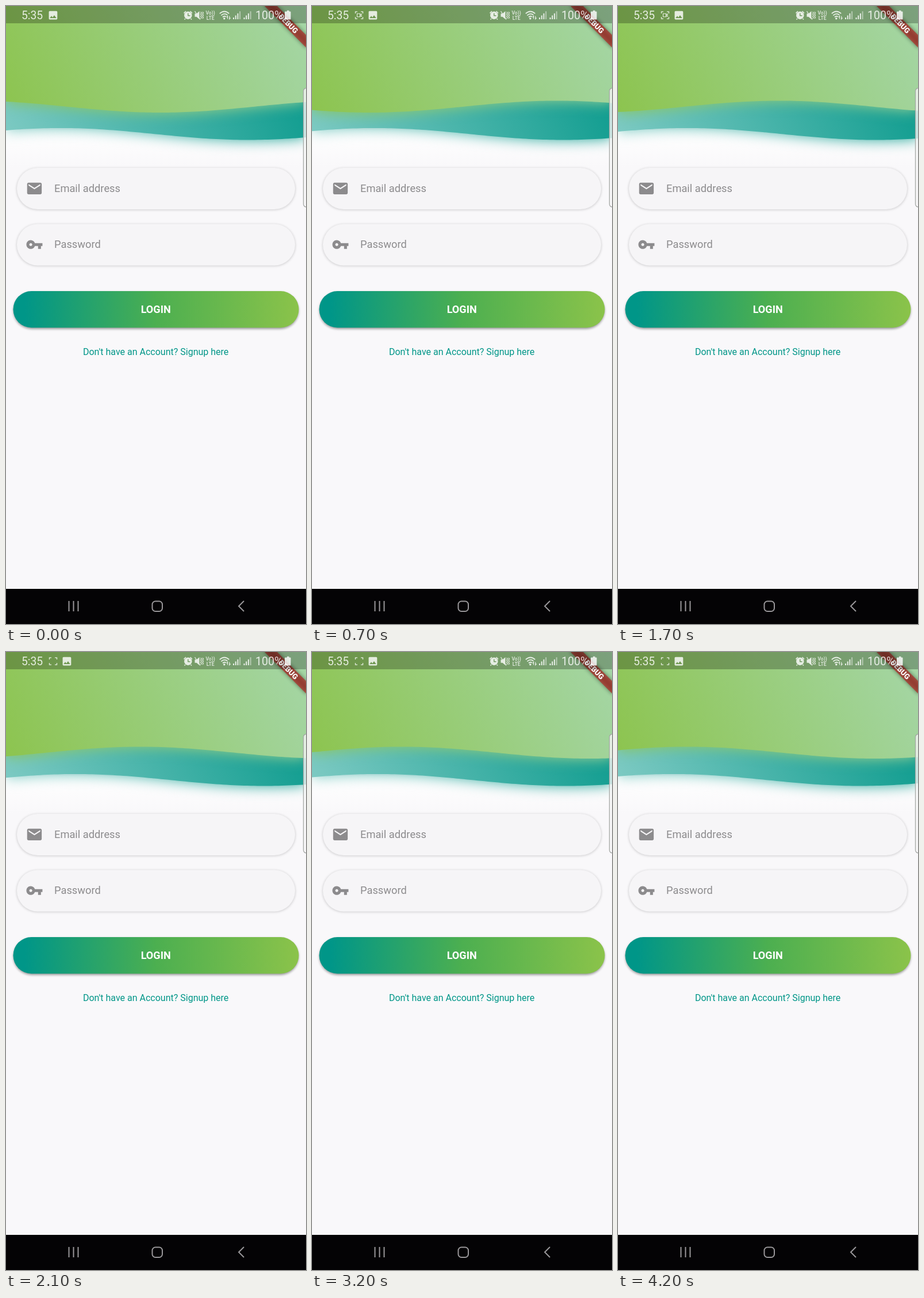
Animation, 522 px wide and 1073 px high, one loop 4300 ms. Source, as an HTML page:

```html
<!DOCTYPE html>
<html lang="en">
<head>
<meta charset="utf-8">
<title>Login</title>
<style>
  html, body { margin: 0; width: 100%; height: 100%; overflow: hidden; background: #f9f8fa; }
  svg { display: block; width: 522px; height: 1073px; font-family: Roboto, sans-serif; }
</style>
</head>
<body>
<svg viewBox="0 0 522 1073" xmlns="http://www.w3.org/2000/svg">
  <defs>
    <linearGradient id="lime" gradientUnits="userSpaceOnUse" x1="0" y1="255" x2="522" y2="0">
      <stop offset="0" stop-color="#8bc34a"/><stop offset="1" stop-color="#a5d6a7"/>
    </linearGradient>
    <linearGradient id="teal" gradientUnits="userSpaceOnUse" x1="0" y1="255" x2="522" y2="0">
      <stop offset="0" stop-color="#80cbc4"/><stop offset="1" stop-color="#009688"/>
    </linearGradient>
    <linearGradient id="action">
      <stop offset="0.04" stop-color="#009688"/><stop offset="0.5" stop-color="#4caf50"/><stop offset="1" stop-color="#8bc34a"/>
    </linearGradient>
    <linearGradient id="page" x2="0" y2="1">
      <stop offset="0" stop-color="#fff"/><stop offset="1" stop-color="#f9f8fa"/>
    </linearGradient>
    <filter id="glow" filterUnits="userSpaceOnUse" x="-50" y="-50" width="622" height="360" color-interpolation-filters="sRGB">
      <feGaussianBlur stdDeviation="12"/>
    </filter>
    <filter id="soft" x="-10%" y="-30%" width="120%" height="160%"><feGaussianBlur stdDeviation="2.2"/></filter>
    <filter id="dim" x="-30%" y="-60%" width="160%" height="220%"><feGaussianBlur stdDeviation="3.5"/></filter>
  </defs>

  <rect width="522" height="1073" fill="#f9f8fa"/>
  <rect y="215" width="522" height="65" fill="url(#page)"/>

  <g fill="url(#teal)"><path class="low" filter="url(#glow)"/><path class="low"/></g>
  <g fill="url(#lime)"><path class="high" filter="url(#glow)"/><path class="high"/></g>

  <g id="fields">
    <g fill="#000" filter="url(#soft)" opacity=".17">
      <rect x="18.5" y="281.5" width="485" height="72.5" rx="36"/>
      <rect x="18.5" y="379" width="485" height="72.5" rx="36"/>
    </g>
    <g fill="#f6f5f7">
      <rect x="19" y="281" width="484" height="72" rx="36"/>
      <rect x="19" y="378.5" width="484" height="72" rx="36"/>
    </g>
    <g fill="#8c8b8d">
      <path transform="translate(34.2 301.7) scale(1.27)" d="M20 4H4c-1.1 0-1.99.9-1.99 2L2 18c0 1.1.9 2 2 2h16c1.1 0 2-.9 2-2V6c0-1.1-.9-2-2-2zm0 4l-8 5-8-5V6l8 5 8-5v2z"/>
      <path transform="translate(34.2 399) scale(1.27)" d="M12.65 10C11.83 7.67 9.61 6 7 6c-3.31 0-6 2.69-6 6s2.69 6 6 6c2.61 0 4.83-1.67 5.65-4H17v4h4v-4h2v-4H12.65zM7 14c-1.1 0-2-.9-2-2s.9-2 2-2 2 .9 2 2-.9 2-2 2z"/>
      <text x="84" y="322.5" font-size="18.3">Email address</text>
      <text x="84" y="420" font-size="18.3">Password</text>
    </g>
  </g>

  <rect x="13" y="497.5" width="496" height="63" rx="31.5" filter="url(#soft)" opacity=".42"/>
  <rect x="12.5" y="495" width="497" height="63.5" rx="31.75" fill="url(#action)"/>
  <g text-anchor="middle">
    <text x="260.7" y="532.5" font-size="18.1" font-weight="700" fill="#fff">LOGIN</text>
    <text x="260.6" y="605.5" font-size="16" fill="#009688">Don't have an Account? Signup here</text>
  </g>

  <g transform="translate(522 0) rotate(45)">
    <rect x="-52" y="35.5" width="104" height="15.5" filter="url(#dim)" opacity=".45"/>
    <rect x="-52" y="35.5" width="104" height="15.5" fill="#b71c1c" fill-opacity=".63"/>
    <text y="47.8" font-size="12.9" font-weight="900" fill="#fff" text-anchor="middle">DEBUG</text>
  </g>

  <rect width="522" height="30" fill-opacity=".25"/>
  <g fill="#fff" stroke="#fff" stroke-width="0" opacity=".82">
    <text x="27" y="23" font-size="19.3">5:35</text>
    <path id="photo" d="M21 19V5c0-1.1-.9-2-2-2H5c-1.1 0-2 .9-2 2v14c0 1.1.9 2 2 2h14c1.1 0 2-.9 2-2zM8.5 13.5l2.5 3.01L14.5 12l4.5 6H5l3.5-4.5z"/>
    <path id="corners" d="M75.5 13V9.800H79M85 9.800H88.500V13M88.500 19V22.200H85M79 22.200H75.500V19" fill="none" stroke-width="1.3"/>
    <path id="camera" d="M78.500 13.300H83.500V18.700H78.500ZM83.500 15.500L86 13.800V18.200L83.500 16.500" fill="none" stroke-width="1.1"/>

    <path d="M309.500 12.500L313 9M324 12.500L320.500 9M312 22L310.500 23.500M321.500 22L323 23.500" stroke-width="1.7"/>
    <path fill-rule="evenodd" d="M316.800 9.500a6.700 6.700 0 1 0 .01 0zM316 12.500h1.500v3.400h3v1.500h-4.500z"/>

    <path d="M328.500 13.300H331.500L336.500 9V23L331.500 18.700H328.500Z"/>
    <path d="M328.500 9L338 23.500M338.800 10l1.300 2-1.300 2 1.300 2-1.300 2 1.300 2-1.300 2M342 10l1.300 2-1.300 2 1.300 2-1.300 2 1.300 2-1.300 2" fill="none" stroke-width="1.3"/>
    <g font-size="8.600" font-weight="500" text-anchor="middle">
      <text x="355.600" y="14.800">Vo))</text>
      <text x="355.600" y="23.500">LTE</text>
    </g>

    <path d="M371.800 13.200Q380 5.800 388.200 13.200M374.400 16.300Q380 11.300 385.200 15.500M377 19.200Q380 16.600 382.600 18.700" fill="none" stroke-width="1.8"/>
    <circle cx="379.800" cy="21.700" r="1.700"/>
    <path d="M385.500 22.500V17.500l-1.700 2M388.800 17.500V22.500l1.700-2" fill="none" stroke-width="1.200"/>
    <g id="bars"></g>
    <text x="434" y="23" font-size="19.500">100%</text>
    <path d="M487.500 9.500h1.500v-1.700h3.500v1.700h2q1 0 1 1v12q0 1-1 1h-8.500q-1 0-1-1v-12q0-1 1-1z"/>
  </g>

  <rect x="517.500" y="142.500" width="14" height="206.500" rx="5" fill="#f5f5f6" fill-opacity=".8" stroke="#a2a5a2" stroke-width="1.200"/>

  <rect y="1012" width="522" height="61" fill="#040305"/>
  <g fill="none" stroke="#99979a" stroke-width="2">
    <path d="M109.500 1033V1051M117.500 1033V1051M125.500 1033V1051"/>
    <rect x="254.500" y="1033.500" width="17.500" height="17.500" rx="5.500"/>
    <path d="M414 1033L405 1042L414 1051"/>
  </g>
</svg>
<script>
  const LOOP = 4300, W = 522;
  const $ = id => document.getElementById(id);
  const lows = document.querySelectorAll('.low');
  const highs = document.querySelectorAll('.high');

  // time in ms, wave phase in degrees
  const keys = [[0, -59], [700, 34], [1100, 69], [1700, 115], [2500, 161], [3200, 183], [4300, 204]];
  const slope = (a, b) => (b[1] - a[1]) / (b[0] - a[0]);
  const slopes = keys.map((k, i) => {
    if (i === 0) return 0.165;
    if (i === keys.length - 1) return 0.012;
    return (slope(keys[i - 1], k) + slope(k, keys[i + 1])) / 2;
  });

  function highPhase(t) {
    let i = 0;
    while (i < keys.length - 2 && t >= keys[i + 1][0]) i++;
    const [t0, p0] = keys[i], [t1, p1] = keys[i + 1];
    const d = t1 - t0, u = (t - t0) / d, v = 1 - u;
    return p0 * v * v * (1 + 2 * u) + p1 * u * u * (3 - 2 * u)
      + d * u * v * (slopes[i] * v - slopes[i + 1] * u);
  }

  function lowPhase(t) {
    const s = (t - 2100) / 1000;
    return 202 + 3.4 * s * s;
  }

  function wave(mid, phase) {
    let d = 'M0 0';
    for (let x = 0; x <= W; x += 6) {
      const a = 1.6 * Math.PI * (x + 1) / W + phase * Math.PI / 180;
      d += `L${x} ${(mid + 10.3 * Math.sin(a)).toFixed(2)}`;
    }
    return d + `L${W} 0Z`;
  }

  function setPath(list, d) {
    list.forEach(p => p.setAttribute('d', d));
  }

  function show(id, on) {
    $(id).setAttribute('visibility', on ? 'visible' : 'hidden');
  }

  function draw(t) {
    setPath(lows, wave(222.2, lowPhase(t)));
    setPath(highs, wave(174.7, highPhase(t)));
    const recording = t >= 300;
    show('corners', recording);
    show('camera', recording && t < 2100);
    $('photo').setAttribute('transform', `translate(${recording ? 96.1 : 72.1} 6.2) scale(.82)`);
  }

  $('bars').innerHTML = [395, 413.5].map(x => [0, 1, 2, 3].map(i => {
    const h = 3 + i * 3.6;
    return `<rect x="${x + i * 3.7}" y="${23 - h}" width="2" height="${h}" opacity="${i === 3 ? .55 : 1}"/>`;
  }).join('')).join('');

  const start = performance.now();
  function tick() {
    draw((performance.now() - start) % LOOP);
    requestAnimationFrame(tick);
  }
  draw(0);
  requestAnimationFrame(tick);
</script>
</body>
</html>
```
